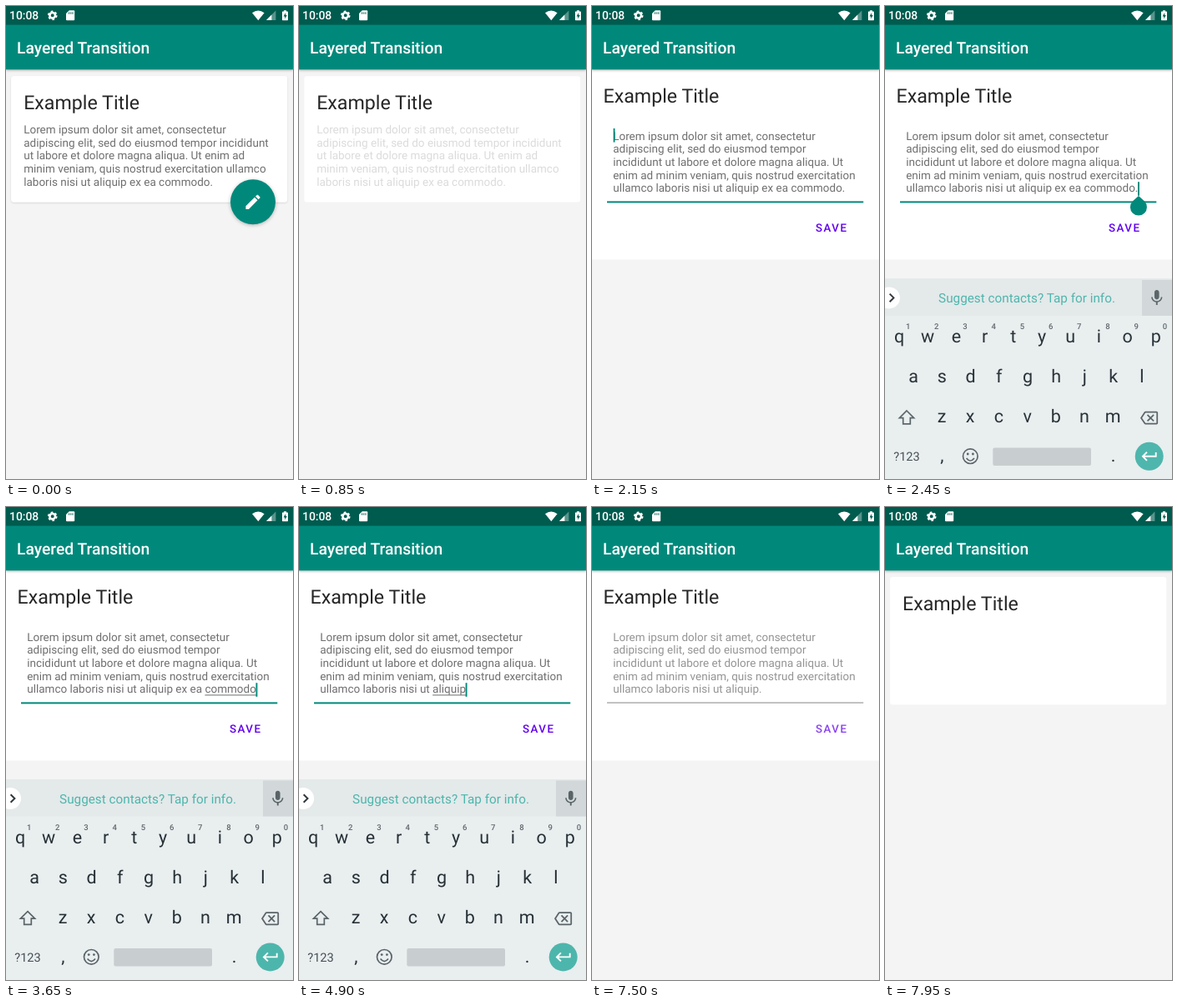
Animation of 344x568 px, one loop 8 s. Source, as an HTML page:

```html
<!DOCTYPE html>
<html lang="en">
<head>
<meta charset="utf-8">
<title>Card editing transition</title>
<style>
  html, body { margin: 0; width: 100%; height: 100%; overflow: hidden; background: #f4f4f4; }
  svg { display: block; width: 344px; height: 568px; font-family: Roboto, sans-serif; }
  text { white-space: pre; text-rendering: geometricPrecision; }
  .medium { font-weight: 500; }
  .body { font-size: 13.5px; fill: #6f6f6f; }
  .mid { text-anchor: middle; }
  .key { font-size: 21.5px; fill: #263036; text-anchor: middle; }
  .hint { font-size: 9.5px; font-weight: 500; fill: #5f686c; text-anchor: middle; }
  #cardShadow { filter: drop-shadow(0 1px 1px rgba(0,0,0,.13)); }
  #bar { filter: drop-shadow(0 1px 1.5px rgba(0,0,0,.28)); }
  #fabDisc { filter: drop-shadow(0 1.5px 2.2px rgba(0,0,0,.28)); }
</style>
</head>
<body>
<svg viewBox="0 0 344 568" xmlns="http://www.w3.org/2000/svg">
  <rect width="344" height="568" fill="#f4f4f4"/>
  <rect id="cardShadow" fill="#fff"/>
  <rect id="card" fill="#fff"/>
  <text id="title" font-size="23.2" fill="#262626">Example Title</text>
  <g id="summary"></g>

  <g id="editor">
    <g id="editLines"></g>
    <rect id="compose" y="225.4" height="1" fill="#6f6f6f"/>
    <rect id="fieldLine" x="18" width="307.3"/>
    <text x="267.9" y="271.4" class="medium" font-size="13.4" letter-spacing="1.45" fill="#6200ee">SAVE</text>
    <rect id="cursor" width="1.9" height="16.6" fill="#00897b"/>
    <path id="handle" d="M0 0 L7.2 6.6 A10 10 0 1 1 -7.2 6.6 Z" fill="#00897b"/>
  </g>

  <g id="fab">
    <circle id="fabDisc" r="27" fill="#00897b"/>
    <path transform="scale(.956) translate(-12 -12)" fill="#fff" d="M3 17.25V21h3.75L17.81 9.94l-3.75-3.75L3 17.25zM20.71 7.04c.39-.39.39-1.02 0-1.41l-2.34-2.34c-.39-.39-1.02-.39-1.41 0l-1.83 1.83 3.75 3.75 1.83-1.83z"/>
  </g>

  <rect id="bar" width="344" height="76.3" fill="#00897b"/>
  <rect width="344" height="22.6" fill="#005b4f"/>
  <text x="13" y="57.3" class="medium" font-size="19.3" fill="#fff">Layered Transition</text>
  <g fill="#fff">
    <text x="4" y="16.2" class="medium" font-size="13.9">10:08</text>
    <circle cx="55.7" cy="11.3" r="3.3" fill="none" stroke="#fff" stroke-width="2.6"/>
    <circle cx="55.7" cy="11.3" r="5" fill="none" stroke="#fff" stroke-width="1.7" stroke-dasharray="2.6 2.636"/>
    <path d="M75.8 5.2H81.2Q82.2 5.2 82.2 6.2V16.2Q82.2 17.2 81.2 17.2H73Q72 17.2 72 16.2V9Z"/>
    <path d="M75.6 7.4v2.3M77.8 7.4v2.3M80 7.4v2.3" stroke="#005b4f"/>
    <path d="M295 8.2Q302.3 2.8 309.6 8.2L302.3 17.2Z"/>
    <path d="M323.4 5.4V17H312Z" opacity=".35"/>
    <path d="M318.4 10.5V17H312Z"/>
    <path d="M333 5.2h3v1.2h1.4q.6 0 .6.6v9.6q0 .6-.6.6h-5.8q-.6 0-.6-.6V7q0-.6.6-.6H333Z"/>
    <path d="M335.2 8l-2.6 4.4h1.7v3.2l2.5-4.5h-1.6Z" fill="#005b4f"/>
  </g>

  <g id="keyboard">
    <rect y="327" width="344" height="300" fill="#e9eeef"/>
    <rect y="327" width="344" height="44.5" fill="#e4e9ea"/>
    <rect x="308" y="328.5" width="36" height="43" fill="#d2d8d9"/>
    <circle cx="5" cy="350" r="13" fill="#fff"/>
    <path d="M5.6 345.2L10.4 350L5.6 354.8" fill="none" stroke="#30383c" stroke-width="2"/>
    <path transform="translate(314.5 338.8) scale(.94)" fill="#5a6468" d="M12 14c1.66 0 3-1.34 3-3V5c0-1.66-1.34-3-3-3S9 3.34 9 5v6c0 1.66 1.34 3 3 3zm5.3-3c0 3-2.54 5.1-5.3 5.1S6.7 14 6.7 11H5c0 3.41 2.72 6.23 6 6.72V21h2v-3.28c3.28-.48 6-3.3 6-6.72h-1.7z"/>
    <text id="notice" x="170" y="356" class="mid" font-size="15.3" fill="#4db6ac">Suggest contacts? Tap for info.</text>
    <g id="words" class="mid" font-size="15" fill="#37474f">
      <text x="68" y="356">Hello</text><text x="164" y="356">I</text><text x="260" y="356">The</text>
    </g>
    <g id="keys"></g>
    <path d="M26 485.6L34.6 494.2H30.3V501.4H21.7V494.2H17.4Z" fill="none" stroke="#5a6468" stroke-width="1.7"/>
    <path transform="translate(306 483.7) scale(.88)" fill="#5a6468" d="M22 3H7c-.69 0-1.23.35-1.59.88L0 12l5.41 8.11c.36.53.9.89 1.59.89h15c1.1 0 2-.9 2-2V5c0-1.1-.9-2-2-2zm0 16H7.07L2.4 12l4.66-7H22v14zM10.41 17L14 13.41 17.59 17 19 15.59 15.41 12 19 8.41 17.59 7 14 10.59 10.41 7 9 8.41 12.59 12 9 15.59z"/>
    <text x="26" y="546" class="mid" font-size="14.6" fill="#455055">?123</text>
    <g fill="none" stroke="#5a6468" stroke-width="1.7">
      <circle cx="102.3" cy="540.3" r="8.8"/>
      <path d="M97.6 542.6Q102.3 548.6 107 542.6"/>
    </g>
    <circle cx="99.2" cy="537.6" r="1.4" fill="#5a6468"/>
    <circle cx="105.4" cy="537.6" r="1.4" fill="#5a6468"/>
    <rect x="129.3" y="530" width="117.7" height="21.6" rx="2" fill="#c8ced0"/>
    <circle cx="316.7" cy="540.4" r="17" fill="#4db6ac"/>
    <path transform="translate(305.7 529) scale(.95)" fill="#fff" d="M19 7v4H5.83l3.58-3.59L8 6l-6 6 6 6 1.41-1.41L5.83 13H21V7z"/>
  </g>
</svg>
<script>
const LOOP = 8000, LINE = 15.7, EDIT_X = 25.2, EDIT_Y = 160.5;
const $ = id => document.getElementById(id);

function set(id, attrs) {
  for (const name in attrs) $(id).setAttribute(name, attrs[name]);
}
function addText(parent, x, y, content, cls) {
  const node = document.createElementNS("http://www.w3.org/2000/svg", "text");
  node.setAttribute("x", x);
  node.setAttribute("y", y);
  node.setAttribute("class", cls);
  node.textContent = content;
  $(parent).append(node);
  return node;
}

const cardLines = [
  "Lorem ipsum dolor sit amet, consectetur",
  "adipiscing elit, sed do eiusmod tempor incididunt",
  "ut labore et dolore magna aliqua. Ut enim ad",
  "minim veniam, quis nostrud exercitation ullamco",
  "laboris nisi ut aliquip ex ea commodo."
];
const editLines = [
  "Lorem ipsum dolor sit amet, consectetur",
  "adipiscing elit, sed do eiusmod tempor",
  "incididunt ut labore et dolore magna aliqua. Ut",
  "enim ad minim veniam, quis nostrud exercitation",
  ""
];
cardLines.forEach((s, i) => addText("summary", 21.2, 153 + i * LINE, s, "body"));
const lastLine = editLines.map((s, i) => addText("editLines", EDIT_X, EDIT_Y + i * LINE, s, "body")).pop();

function addRow(letters, firstX, y) {
  [...letters].forEach((c, i) => addText("keys", firstX + i * 34.2, y, c, "key"));
}
addRow("qwertyuiop", 17, 403.5);
addRow("asdfghjkl", 34.2, 451.5);
addRow("zxcvbnm", 68, 499.8);
addText("keys", 68.3, 547, ",", "key");
addText("keys", 273.6, 547, ".", "key");
[..."1234567890"].forEach((c, i) => addText("keys", 27.6 + i * 34.2, 388, c, "hint"));

// Each edit: start time, last line after "ut ", word being composed.
const STEM = "ullamco laboris nisi ut ";
const edits = [
  [0, "aliquip ex ea commodo.", ""],
  [3650, "aliquip ex ea commodo", "commodo"],
  [3950, "aliquip ex ea ", ""],
  [4050, "aliquip ex ea", "ea"],
  [4100, "aliquip ex ", ""],
  [4150, "aliquip ex", "ex"],
  [4300, "aliquip e", "e"],
  [4700, "aliquip ", ""],
  [4850, "aliquip", ""],
  [4900, "aliquip", "aliquip"],
  [5050, "aliquip.", ""]
];
const cursorOff = [[2750, 3300], [5550, 6100], [6600, 7150]];

const pen = document.createElement("canvas").getContext("2d");
const widthOf = s => (pen.font = "13.5px Roboto, sans-serif", pen.measureText(s).width);

const within = (t, a, b) => t >= a && t < b;
const progress = (t, start, length) => Math.min(1, Math.max(0, (t - start) / length));
const ease = p => .5 - Math.cos(p * Math.PI) / 2;
const decelerate = p => 1 - (1 - p) ** 2;
const mix = (a, b, p) => a + (b - a) * p;
const show = (id, on) => set(id, { visibility: on ? "visible" : "hidden" });

function drawCard(t) {
  const open = ease(progress(t, 950, 300)) - ease(progress(t, 7688, 296));
  const left = mix(6.3, 0, open), top = mix(84.2, 76.3, open);
  const box = {
    x: left, y: top, width: 344 - 2 * left - mix(.6, 0, open),
    height: mix(235.4, 304.4, open) - top, rx: mix(3, 0, open)
  };
  set("card", box);
  set("cardShadow", box);
  set("title", { x: mix(21.2, 13.5, open), y: mix(124, 115.8, open) });
  set("summary", { opacity: 1 - ease(progress(t, 650, 300)) });

  const hide = progress(t, 480, 200);
  set("cardShadow", { opacity: 1 - hide });
  set("fab", {
    transform: `translate(296 235.3) scale(${1 - ease(hide)})`,
    opacity: 1 - hide * hide
  });
  show("fab", hide < 1);
}

function drawEditor(t) {
  const focused = within(t, 2150, 7350);
  const opacity = ease(progress(t, 1320, 300)) - ease(progress(t, 7405, 283));
  set("editor", { opacity });

  const [, tail, word] = edits.filter(e => e[0] <= t).pop();
  const line = STEM + tail;
  lastLine.textContent = line;
  const end = EDIT_X + widthOf(line), wordWidth = widthOf(word);
  set("compose", { x: end - wordWidth, width: wordWidth });

  set("fieldLine", focused
    ? { y: 234.4, height: 2, fill: "#00897b" }
    : { y: 234.5, height: 1.1, fill: "#6a6a6a" });

  const atStart = t < 2250;
  set("cursor", { x: atStart ? EDIT_X + .4 : end - .4, y: atStart ? 147 : 211.2 });
  show("cursor", focused && !cursorOff.some(([a, b]) => within(t, a, b)));
  set("handle", { transform: `translate(${end + .5} 228)` });
  show("handle", within(t, 2250, 3500));
}

function drawKeyboard(t) {
  const shown = decelerate(progress(t, 2260, 220)) - progress(t, 6470, 180);
  set("keyboard", { opacity: shown, transform: `translate(0 ${24 * (1 - shown)})` });
  show("keyboard", shown > 0);
  set("notice", { opacity: t < 5050 ? 1 : 0 });
  set("words", { opacity: within(t, 5100, 6350) ? 1 : 0 });
}

function draw(t) {
  drawCard(t);
  drawEditor(t);
  drawKeyboard(t);
}

const began = performance.now();
function tick() {
  draw((performance.now() - began) % LOOP);
  requestAnimationFrame(tick);
}
draw(0);
requestAnimationFrame(tick);
</script>
</body>
</html>
```
